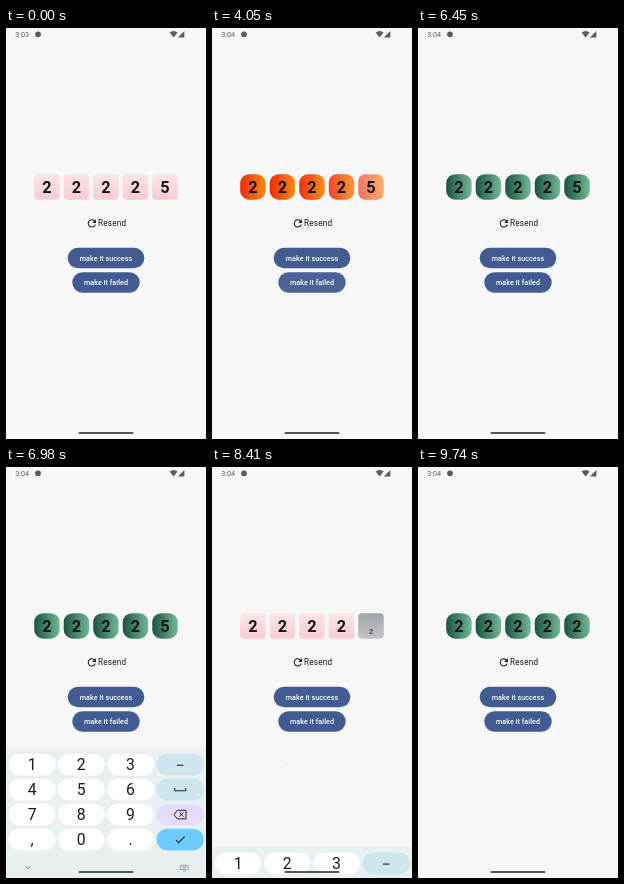
These frames come from a looping animation (200 px wide and 411 px high, 9.84 s). An HTML page with a canvas:

```html
<!DOCTYPE html>
<html lang="en">
<head>
<meta charset="utf-8">
<title>Code input</title>
<style>
html, body { margin: 0; width: 100%; height: 100%; overflow: hidden; background: #f7f7f7; }
canvas { display: block; width: 200px; height: 411px; }
</style>
</head>
<body>
<canvas></canvas>
<script>
const W = 200, H = 411, LOOP = 9840;
const canvas = document.querySelector('canvas');
const g = canvas.getContext('2d');
const dpr = window.devicePixelRatio || 1;
canvas.width = W * dpr;
canvas.height = H * dpr;

const INK = '#151518', GREY = '#5b5c60';
const CELL = 25.45, STEP = 29.52, LEFT = 28.2, TOP = 146.2, MORPH = 440;

// Cell looks: gradient colours, direction, corner radius
const LOOKS = {
  idle: { colors: ['#fce5e7', '#f8cbd4'], across: false, r: 4 },
  empty: { colors: ['#8e999f', '#bbc1c5'], across: false, r: 4 },
  failed: { colors: ['#f12a0c', '#fb8c0c'], across: true, r: 9 },
  success: { colors: ['#1c5244', '#72b994'], across: true, r: 9 }
};
// Each change: start time, delay per cell, look, look of the last cell
const CHANGES = [
  [-MORPH, 0, 'idle'],
  [3564, 80, 'failed'],
  [5164, 80, 'success'],
  [7390, 0, 'idle', 'empty'],
  [8320, 0, 'idle'],
  [8984, 80, 'success']
];

const clamp = x => Math.min(1, Math.max(0, x));
const mix = (a, b, p) => a + (b - a) * p;

// Standard curve: cubic-bezier(.4, 0, .2, 1)
function ease(x) {
  x = clamp(x);
  if (x === 0 || x === 1) return x;
  let lo = 0, hi = 1, u;
  for (let i = 0; i < 20; i++) {
    u = (lo + hi) / 2;
    const at = 1.2 * (1 - u) ** 2 * u + 0.6 * (1 - u) * u * u + u ** 3;
    if (at < x) lo = u; else hi = u;
  }
  return 3 * (1 - u) * u * u + u ** 3;
}
const tween = (t, start, length) => ease((t - start) / length);

function pill(x, y, w, h, r, fill) {
  g.beginPath();
  g.roundRect(x, y, w, h, r);
  g.fillStyle = fill;
  g.fill();
}

function disc(x, y, r, fill) {
  g.beginPath();
  g.arc(x, y, r, 0, 7);
  g.fillStyle = fill;
  g.fill();
}

function text(s, x, y, size, weight, color, align = 'center', spacing = 0) {
  g.font = `${weight} ${size}px Roboto, sans-serif`;
  g.letterSpacing = spacing + 'px';
  g.textAlign = align;
  g.fillStyle = color;
  g.fillText(s, x, y);
}

function stroke(path, color, width = 1.1) {
  g.strokeStyle = color;
  g.lineWidth = width;
  g.stroke(new Path2D(path));
}

function statusBar(t) {
  text(t < 3430 ? '3:03' : '3:04', 9.3, 8.8, 7.2, 400, GREY, 'left');
  disc(32, 6.3, 2.9, GREY);
  g.fillStyle = GREY;
  g.fill(new Path2D('M163.6 4.6Q167.6 1.4 171.6 4.6L167.6 9.6Z'));
  g.fill(new Path2D('M171.9 9.6H178.4V3Z'));
}

function paintLook(look, x, r, alpha) {
  const grad = look.across
    ? g.createLinearGradient(x, 0, x + CELL, 0)
    : g.createLinearGradient(0, TOP, 0, TOP + CELL);
  look.colors.forEach((c, i) => grad.addColorStop(i, c));
  g.globalAlpha = alpha;
  pill(x, TOP, CELL, CELL, r, grad);
  g.globalAlpha = 1;
}

// The digit shrinks and sinks while hidden
function digit(s, x, shown) {
  if (shown <= 0) return;
  const k = mix(0.4, 1, shown);
  g.save();
  g.globalAlpha = Math.min(1, shown * 4);
  g.translate(x + CELL / 2, TOP + CELL / 2 + 6 * (1 - shown));
  g.scale(k, k);
  text(s, 0, 5.8, 16.3, 700, INK);
  g.restore();
}

function cell(i, t) {
  const x = LEFT + i * STEP;
  const startOf = c => c[0] + i * c[1];
  const lookOf = c => LOOKS[i === 4 && c[3] || c[2]];
  let n = CHANGES.length - 1;
  while (n > 0 && t < startOf(CHANGES[n])) n--;
  const to = lookOf(CHANGES[n]);
  const from = lookOf(CHANGES[Math.max(0, n - 1)]);
  const p = tween(t, startOf(CHANGES[n]), MORPH);
  const r = mix(from.r, to.r, p);
  if (p < 1) paintLook(from, x, r, 1);
  if (p > 0) paintLook(to, x, r, p);
  if (i < 4) return digit('2', x, 1);
  if (t < 8320) digit('5', x, 1 - tween(t, 7390, MORPH));
  else digit('2', x, tween(t, 8320, MORPH));
}

function button(label, y, w, t, taps) {
  const x = 100 - w / 2, h = 20.4;
  pill(x, y, w, h, h / 2, '#425b91');
  for (const tap of taps) {
    const age = t - tap;
    if (age < 0 || age > 750) continue;
    g.save();
    g.beginPath();
    g.roundRect(x, y, w, h, h / 2);
    g.clip();
    const alpha = 0.13 * clamp(age / 80) * clamp((750 - age) / 350);
    disc(100, y + h / 2, mix(12, 42, tween(age, 0, 260)), `rgba(255,255,255,${alpha})`);
    g.restore();
  }
  text(label, 100, y + 12.8, 7.15, 500, '#fff', 'center', 0.05);
}

function resend() {
  g.save();
  g.translate(79.7, 189.3);
  g.scale(0.509, 0.509);
  g.fillStyle = INK;
  g.fill(new Path2D('M17.65 6.35A7.96 7.96 0 0 0 12 4c-4.42 0-7.99 3.58-7.99 8s3.57 8 7.99 8c3.73 0 6.84-2.55 7.73-6h-2.08A5.99 5.99 0 0 1 12 18c-3.31 0-6-2.69-6-6s2.69-6 6-6c1.66 0 3.14.69 4.22 1.78L13 11h7V4z'));
  g.restore();
  text('Resend', 92, 198.3, 8.15, 400, INK, 'left', 0.25);
}

function keyboard(t) {
  const shown = tween(t, 6700, 290) - tween(t, 8273, 285);
  if (shown <= 0) return;
  g.save();
  g.translate(0, 131 * (1 - shown));
  g.fillStyle = '#e8f0f1';
  g.fillRect(0, 280.5, W, 131);
  const sides = ['#cde6ee', '#cde6ee', '#e5dcfd', '#6fcbfd'];
  ['123', '456', '789', ',0.'].forEach((row, r) => {
    const y = 286.6 + r * 25;
    [...row].forEach((s, c) => {
      const x = 2.8 + c * 49.2;
      const pressed = s === '2' && t > 8100 && t < 8260;
      pill(x, y, 46.6, 21.8, 10.9, pressed ? '#dfe6e8' : '#fff');
      text(s, x + 23.3, y + 16.6, 15.8, 400, '#171c1e');
    });
    const held = r === 2 && t > 7340 && t < 7480;
    pill(150.5, y, 47.3, 21.8, 10.9, held ? '#cfc5ea' : sides[r]);
  });
  const dark = '#20282c';
  stroke('M171 298.2H177.5', dark);
  stroke('M168.7 321.2V323.7H179.7V321.2', dark);
  stroke('M171.4 343.2H180V351.8H171.4L168 347.5ZM173.3 345.4L177.5 349.6M177.5 345.4L173.3 349.6', dark, 1);
  stroke('M169.8 372.8L172.6 375.6L178.6 369.6', dark);
  stroke('M19.6 399.2L22 401.6L24.4 399.2', GREY, 0.9);
  stroke('M174.3 398.2H182.2V402.4H174.3ZM175.5 399.6H181M176.5 401.1H180M177 404H179.5', '#858c8f', 0.7);
  g.restore();
}

function touchMark(t) {
  if (t < 8100 || t > 8470) return;
  g.globalAlpha = clamp((8470 - t) / 100);
  g.beginPath();
  g.arc(69, 297.5, 4.2, 0, 7);
  g.strokeStyle = '#e9e9ea';
  g.lineWidth = 0.8;
  g.stroke();
  g.globalAlpha = 1;
}

function draw(now) {
  const t = now % LOOP;
  g.setTransform(dpr, 0, 0, dpr, 0, 0);
  g.fillStyle = '#f7f7f7';
  g.fillRect(0, 0, W, H);
  statusBar(t);
  for (let i = 0; i < 5; i++) cell(i, t);
  resend();
  button('make it success', 219.8, 76.6, t, [5030, 8850]);
  button('make it failed', 244.3, 67.4, t, [3430]);
  keyboard(t);
  touchMark(t);
  pill(72.5, 403.9, 55, 2.1, 1, '#55565a');
}

const begin = performance.now();
function loop() {
  draw(performance.now() - begin);
  requestAnimationFrame(loop);
}
loop();
</script>
</body>
</html>
```
